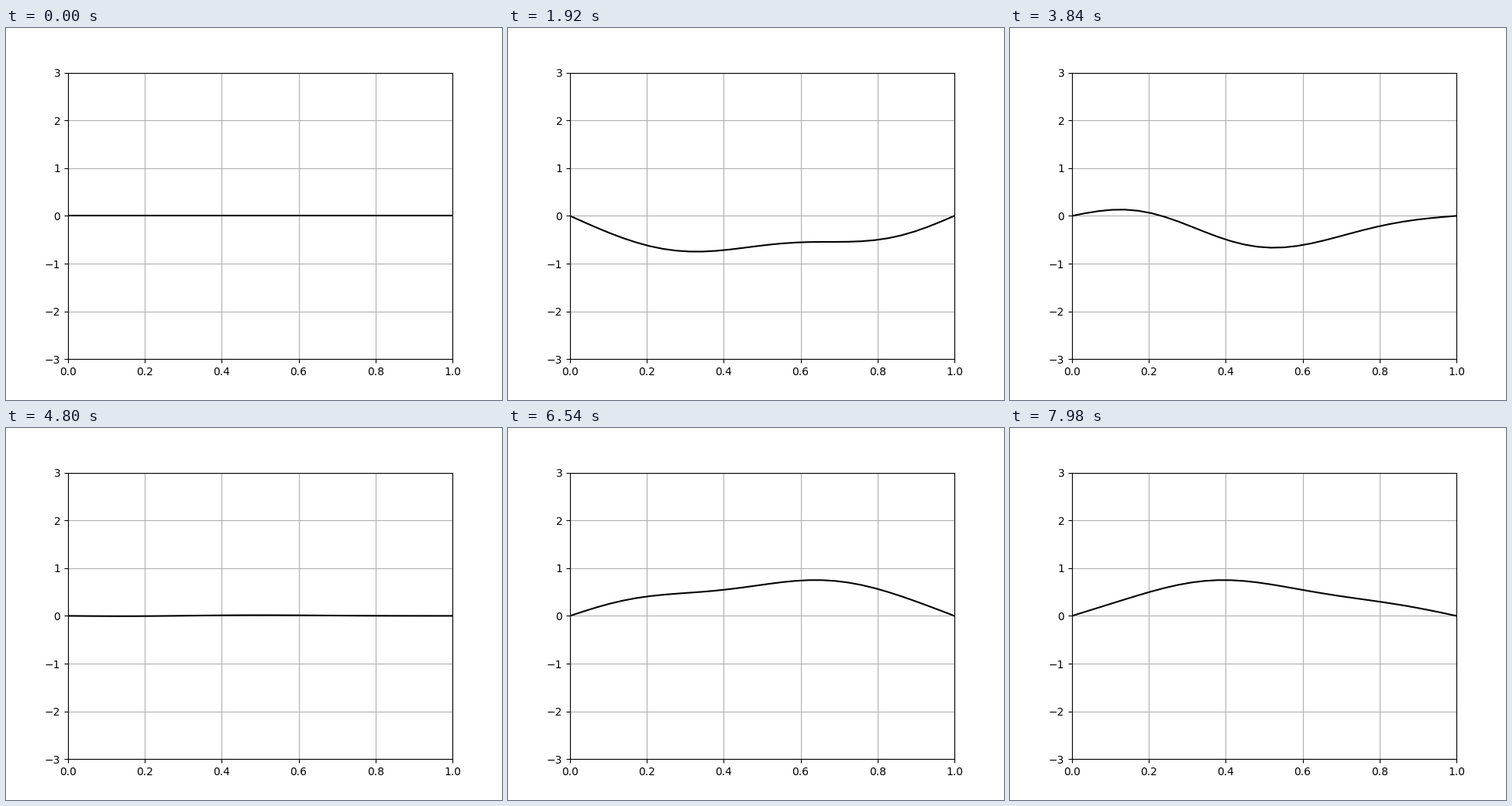
Recreate the animation shown at these times as a matplotlib script. Size 640x480 px, loop 8000 ms.

```python
import numpy as np
import matplotlib.pyplot as plt
from matplotlib.animation import FuncAnimation

TICK = 20          # ms per animation frame
HOLD = 3           # frames each pose stays on screen
LOOP = 8000        # ms
PHASE_STEP = 0.01254 * np.pi

# String fixed at both ends: standing waves starting from rest position
AMPS = np.array([-0.785, -0.143, 0.213, -0.037])
MODES = np.arange(1, len(AMPS) + 1)

x = np.linspace(0, 1, 30)
shapes = np.sin(np.pi * np.outer(MODES, x))


def displacement(step):
    return (AMPS * np.sin(MODES * PHASE_STEP * step)) @ shapes


fig, ax = plt.subplots(figsize=(6.4, 4.8), dpi=100)
ax.set_xlim(0, 1)
ax.set_ylim(-3, 3)
ax.grid(True)
line, = ax.plot(x, displacement(0), color="black", lw=1.5)


def update(i):
    line.set_ydata(displacement(i // HOLD))
    return line,


anim = FuncAnimation(fig, update, frames=LOOP // TICK, interval=TICK,
                     init_func=lambda: update(0), repeat=True,
                     repeat_delay=0, blit=False)
plt.show()
```
